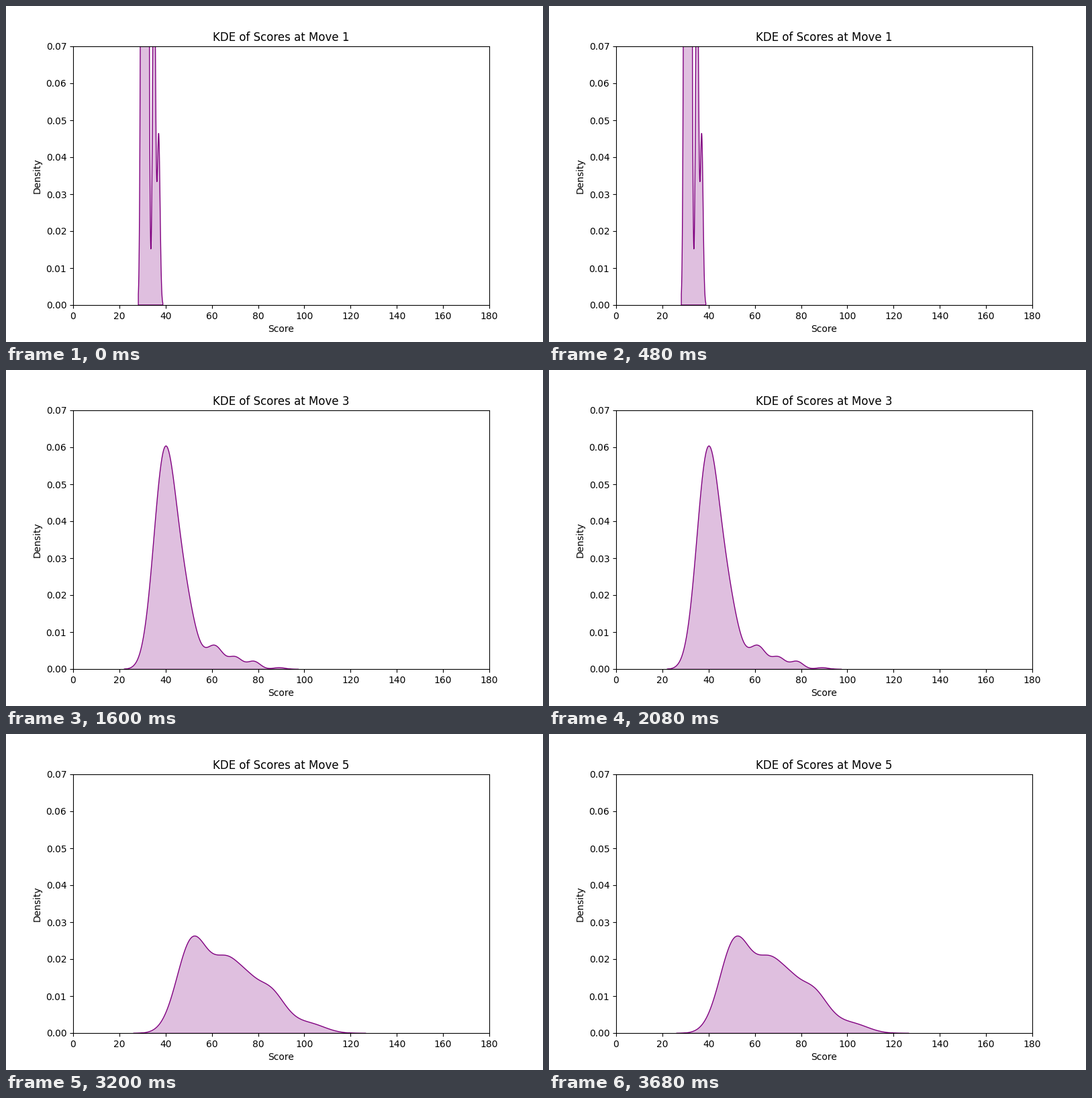
These frames come from a looping animation (800x500 px, 4 s). A matplotlib script:

```python
import numpy as np
import matplotlib.pyplot as plt
from matplotlib.animation import FuncAnimation

W, H, DPI = 800, 500, 100

# Per move: score range, then bumps as (center, height in thousandths, width).
MOVES = [
    ((28.2, 38.8), [(30, 260, 0.6), (32, 290, 0.6), (35, 108, 0.6),
                    (37, 46, 0.6)]),
    ((26.1, 65), [(32.15, 69, 1.75), (36, 110, 1.6), (39.7, 43, 1.95),
                  (44.7, 8.8, 1.5), (52.1, 3.85, 1.35), (55.1, 3.1, 1.3),
                  (61, 0.6, 1.3)]),
    ((21.9, 97.4), [(39.3, 55.5, 4.7), (47.6, 18.6, 4.9), (61.2, 6.1, 3.5),
                    (70, 3.2, 3), (78, 2.15, 2.8), (89, 0.47, 2.75)]),
    ((18.4, 122.8), [(44.2, 33.2, 6.45), (55.3, 17.4, 5.5), (66.5, 9.8, 5),
                     (79, 6.7, 5.1), (90.5, 2.3, 4), (110, 0.17, 4.2)]),
    ((25.9, 126.5), [(51.3, 24.6, 6.6), (66.8, 18.5, 6.9), (75.5, 2.4, 4),
                     (84, 12, 7.2), (102, 2.5, 7)]),
]


def density(span, bumps):
    """Sum of Gaussian bumps sampled over the span."""
    x = np.linspace(*span, 200)
    y = sum(h * np.exp(-0.5 * ((x - c) / w) ** 2) for c, h, w in bumps)
    return x, y / 1000


plt.rcParams["font.family"] = "DejaVu Sans"
fig, ax = plt.subplots(figsize=(W / DPI, H / DPI), dpi=DPI)
fig.subplots_adjust(left=0.125, right=0.9, bottom=0.11, top=0.88)


def draw(i):
    ax.clear()
    x, y = density(*MOVES[i])
    ax.fill_between(x, 0, y, facecolor=(0.5, 0, 0.5, 0.25),
                    edgecolor="purple", linewidth=1)
    ax.set(xlim=(0, 180), ylim=(0, 0.07), xlabel="Score",
           ylabel="Density", title=f"KDE of Scores at Move {i + 1}")


anim = FuncAnimation(fig, draw, frames=len(MOVES), init_func=lambda: None,
                     interval=800, repeat=True, repeat_delay=0)
plt.show()
```
